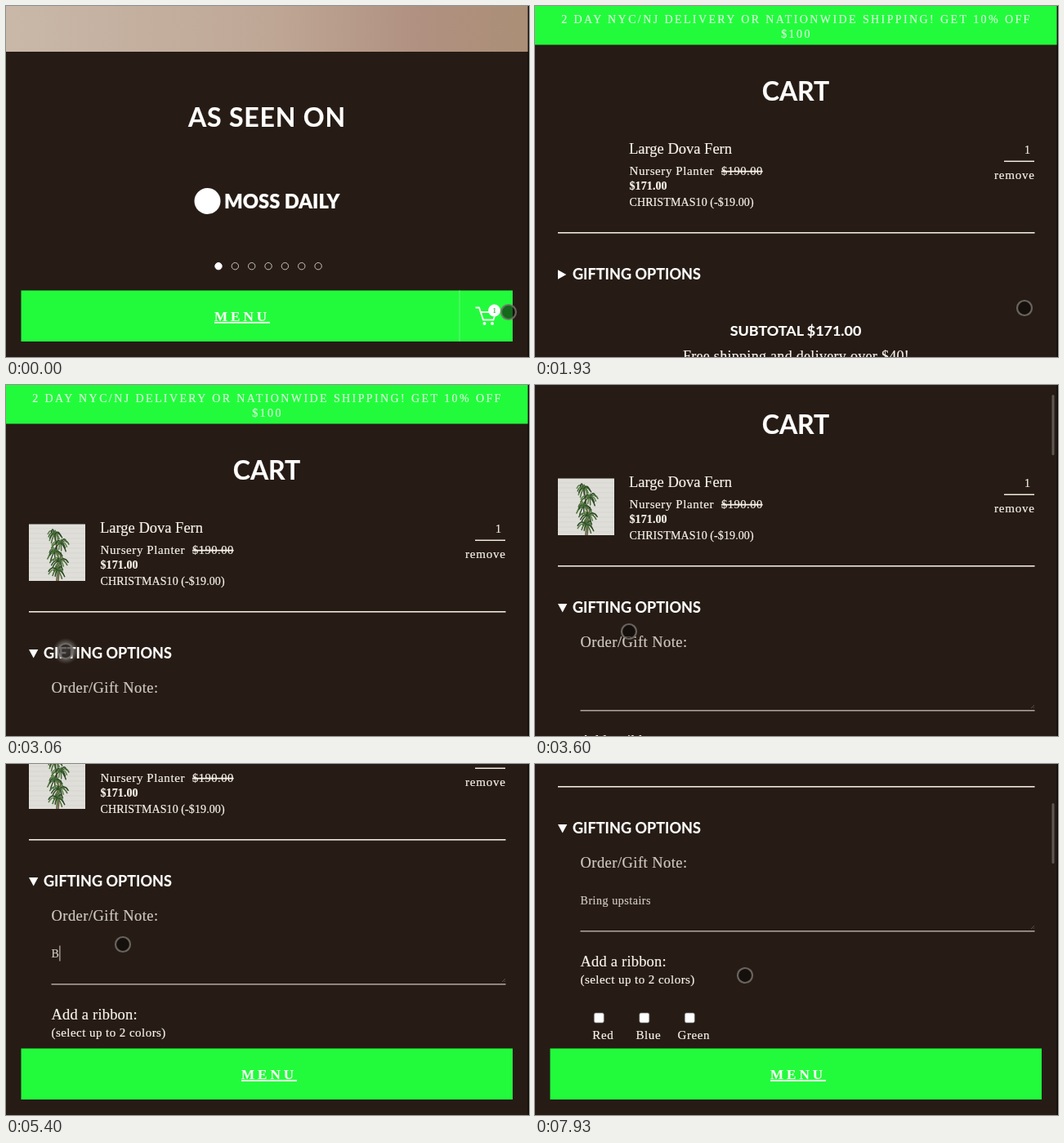
Animation of 640 by 430 pixels, one loop 8000 ms. Source, as an HTML page:

```html
<!DOCTYPE html>
<html lang="en">
<head>
<meta charset="utf-8">
<title>Cart demo</title>
<style>
html, body { margin: 0; width: 100%; height: 100%; overflow: hidden; background: #261c15; }
svg { display: block; width: 640px; height: 430px; }
text { font-family: "Liberation Serif", "Times New Roman", serif; fill: #f7f2ea; stroke: #f7f2ea; stroke-width: .2; white-space: pre; }
.head { font-family: Lato, "Open Sans", sans-serif; font-weight: 700; fill: #fff; }
.mid { text-anchor: middle; }
.bold { font-weight: 700; }
.dim { fill: #cfc8c0; stroke: #cfc8c0; }
.pale { fill: #d8ffdc; stroke: #d8ffdc; }
.strike { text-decoration: line-through; }
.menu { font-weight: 700; text-decoration: underline; fill: #f4fff2; }
</style>
</head>
<body>
<svg viewBox="0 0 640 430">
  <defs>
    <linearGradient id="sand">
      <stop offset="0" stop-color="#c9b8a8"/>
      <stop offset=".5" stop-color="#bfa796"/>
      <stop offset=".8" stop-color="#b09080"/>
      <stop offset="1" stop-color="#ab8f76"/>
    </linearGradient>
    <radialGradient id="halo">
      <stop offset="0" stop-color="#fff" stop-opacity=".5"/>
      <stop offset=".65" stop-color="#ccc" stop-opacity=".35"/>
      <stop offset="1" stop-color="#aaa" stop-opacity="0"/>
    </radialGradient>
    <clipPath id="frame"><rect x="28" y="170.5" width="69" height="69.5"/></clipPath>
  </defs>
  <rect width="640" height="430" fill="#261c15"/>

  <g id="home">
    <rect width="640" height="56" fill="url(#sand)"/>
    <circle cx="246.5" cy="239" r="16" fill="#fff"/>
  </g>

  <g id="cart">
    <rect width="640" height="47.5" fill="#22fb3c"/>
    <g id="photo" clip-path="url(#frame)"></g>
    <rect x="574" y="189.5" width="37" height="1.5" fill="#f0eadf"/>
    <rect x="28" y="277" width="583.5" height="1.6" fill="#efe9df"/>
    <path id="arrow" fill="#fff"/>
    <g id="closed"></g>
    <g id="opened">
      <rect x="55.5" y="454" width="556" height="1.6" fill="#a8a098"/>
      <path d="M607 452l4-4M609.5 452l1.5-1.5" stroke="#6d655e" stroke-width=".7"/>
      <rect id="caret" y="407.5" width="1" height="19" fill="#d8d2ca"/>
    </g>
  </g>

  <g id="menu">
    <rect x="18.5" y="348.5" width="601.5" height="62.5" fill="#22fb3c"/>
    <g id="basket">
      <path d="M555 348.5V411" stroke="#6bf57a"/>
      <path d="M574.5 369.5h4.5l5 15h12.5l3-9.5h-18" fill="none" stroke="#f4fff2" stroke-width="1.9"/>
      <circle cx="585.5" cy="389" r="2" fill="#f4fff2"/>
      <circle cx="595" cy="389" r="2" fill="#f4fff2"/>
      <circle cx="597.5" cy="373" r="7.4" fill="#fff"/>
    </g>
  </g>

  <rect x="638.6" width="1.4" height="430" fill="#0e0a08"/>
  <rect id="bar" x="632.5" width="3" height="74" rx="1.5" fill="#5d5753"/>
  <g id="pointer">
    <circle id="press" r="16" fill="url(#halo)"/>
    <circle r="9" fill="#0b0806" fill-opacity=".6" stroke="#77716c" stroke-opacity=".85" stroke-width="2.2"/>
  </g>
</svg>
<script>
const $ = id => document.getElementById(id);
const LOOP = 8000;
const NOTE = "Bring upstairs";

function add(parent, tag, attrs) {
  const el = document.createElementNS("http://www.w3.org/2000/svg", tag);
  for (const k in attrs) el.setAttribute(k, attrs[k]);
  return parent.appendChild(el);
}

function label(parent, str, x, y, size, spacing = 0, cls = "") {
  const el = add($(parent), "text", { x, y, "font-size": size, "letter-spacing": spacing, class: cls });
  el.textContent = str;
  return el;
}

// Home page
label("home", "AS SEEN ON", 319.5, 147.5, 32, 0.8, "head mid");
label("home", "MOSS DAILY", 267, 248, 23.7, 0, "head").style.fontWeight = 900;
for (let i = 0; i < 7; i++)
  add($("home"), "circle", { cx: 260 + 20.35 * i, cy: 318.7, r: 4.2, fill: i ? "none" : "#fff", stroke: i ? "#c9c3bb" : "#fff" });

// Cart page
label("cart", "2 DAY NYC/NJ DELIVERY OR NATIONWIDE SHIPPING! GET 10% OFF", 320, 21, 14, 2.4, "mid pale");
label("cart", "$100", 320, 39, 14, 2.4, "mid pale");
label("cart", "CART", 319, 116, 32, 0, "head mid");
label("cart", "Large Dova Fern", 115, 181, 18.5);
label("cart", "Nursery Planter", 115.5, 207, 15, 0.6);
label("cart", "$190.00", 228, 207, 14.5, 0.5, "strike");
label("cart", "$171.00", 115.5, 224.5, 14, 0.1, "bold");
label("cart", "CHRISTMAS10 (-$19.00)", 115.5, 244.5, 14, 0.1);
label("cart", "1", 599, 180.5, 14);
label("cart", "remove", 562, 212, 15, 0.8);
label("cart", "GIFTING OPTIONS", 46, 335, 18, 0.05, "head");

label("closed", "SUBTOTAL $171.00", 319, 403.5, 17.9, 0, "head mid");
label("closed", "Free shipping and delivery over $40!", 319.5, 435, 18, 0.3, "mid");

label("opened", "Order/Gift Note:", 55.5, 377, 18.5, 0.45, "dim");
const note = label("opened", "", 55.5, 422, 14, 0.54, "dim");
label("opened", "Add a ribbon:", 55.5, 498, 18.5, 0.2);
label("opened", "(select up to 2 colors)", 55.5, 518.5, 15, 0.45);
["Red", "Blue", "Green"].forEach((name, i) => {
  const x = 78.3 + 55.5 * i;
  add($("opened"), "rect", { x: x - 6, y: 555, width: 12, height: 12, rx: 2, fill: "#fff", stroke: "#777", "stroke-width": 0.7 });
  label("opened", name, x + 5, 587, 15, 0.6, "mid");
});

const menuText = label("menu", "MENU", 255, 386, 17, 4, "menu");
label("basket", "1", 595.7, 376, 8, 0, "bold").style.fill = "#1fae35";

// Potted plant against a pale brick wall
function drawPlant() {
  const g = $("photo");
  add(g, "rect", { x: 28, y: 170, width: 69, height: 71, fill: "#dfded9" });
  for (let y = 176; y < 240; y += 6)
    add(g, "path", { d: `M28 ${y}H97`, stroke: "#d3d1cb", "stroke-width": 0.7 });
  add(g, "path", { d: "M62 240L64 210L59 182M64 240L67 205", stroke: "#6b5a41", "stroke-width": 1.6, fill: "none" });
  const greens = ["#2c4a25", "#466b35", "#5b7d48"];
  for (let c = 0; c < 5; c++) {
    const x = 63 + 4 * Math.sin(c * 2.6 - 1), y = 183 + 11 * c;
    for (let i = 0; i < 13; i++) {
      const a = i / 13 * Math.PI * 2 + c, len = 9 + 3 * Math.sin(i * 5 + c);
      const dx = Math.cos(a) * len, dy = Math.sin(a) * len * 0.6;
      add(g, "path", {
        d: `M${x} ${y}q${dx * 0.6} ${dy - 4} ${dx} ${dy + 4}`,
        fill: "none", stroke: greens[i % 3], "stroke-width": 1.5, "stroke-linecap": "round"
      });
    }
  }
}
drawPlant();

// Progress from 0 to 1 between two times, and easings on it
const ramp = (t, from, to) => Math.min(1, Math.max(0, (t - from) / (to - from)));
const smooth = p => p * p * (3 - 2 * p);
const coast = p => 1 - (1 - p) ** 1.5;

const scrollAt = t => Math.round(185 * coast(ramp(t, 3475, 4060)) + 65 * smooth(ramp(t, 7500, 7930)));
const barAt = t => ramp(t, 3470, 3530) - ramp(t, 4200, 4530) + ramp(t, 7470, 7530);

const clicks = [930, 3040, 4430];
const glowAt = t => Math.max(0, ...clicks.map(c => 1 - Math.abs(t - c) / 130));

// Pointer moves: start, end, destination
const moves = [
  [0, 860, 599, 370],
  [2200, 2860, 73, 326],
  [3300, 3600, 115, 302],
  [3600, 4060, 143, 221],
  [7500, 7930, 257, 259]
];
function pointerAt(t) {
  let x = 615, y = 375;
  for (const [from, to, toX, toY] of moves) {
    const p = smooth(ramp(t, from, to));
    x += (toX - x) * p;
    y += (toY - y) * p;
  }
  return [x, y];
}

// A pause follows the first letter, then the rest comes at an even pace
function typedAt(t) {
  if (t < 5400) return 0;
  return Math.min(NOTE.length, 1 + Math.max(0, Math.floor((t - 5730) / 90) + 1));
}

const show = (id, on) => { $(id).style.display = on ? "" : "none"; };
const move = (id, x, y) => $(id).setAttribute("transform", `translate(${x} ${y})`);

function draw(t) {
  const onCart = t >= 1400, open = t >= 3000, y = scrollAt(t);
  show("home", !onCart);
  show("cart", onCart);
  show("photo", t >= 2130);
  show("closed", !open);
  show("opened", open);
  show("basket", !onCart);
  $("arrow").setAttribute("d", open ? "M28 324H39.3L33.7 334.5Z" : "M28 323.2L38.3 329L28 334.8Z");
  move("cart", 0, -y);

  menuText.setAttribute("x", onCart ? 288 : 255);
  move("menu", 0, onCart ? 85 * (1 - ramp(t, 3660, 3930)) : 0);

  const count = typedAt(t);
  note.textContent = NOTE.slice(0, count);
  $("caret").setAttribute("x", 55.5 + (count ? note.getComputedTextLength() : 0));
  show("caret", (t >= 4400 && t < 5060) || (t >= 5400 && t < 7530));

  $("bar").setAttribute("y", 1.6 + y * 0.186);
  $("bar").setAttribute("opacity", barAt(t));
  move("pointer", ...pointerAt(t));
  $("press").setAttribute("opacity", glowAt(t));
}

const start = performance.now();
function tick() {
  draw((performance.now() - start) % LOOP);
  requestAnimationFrame(tick);
}
tick();
</script>
</body>
</html>
```
